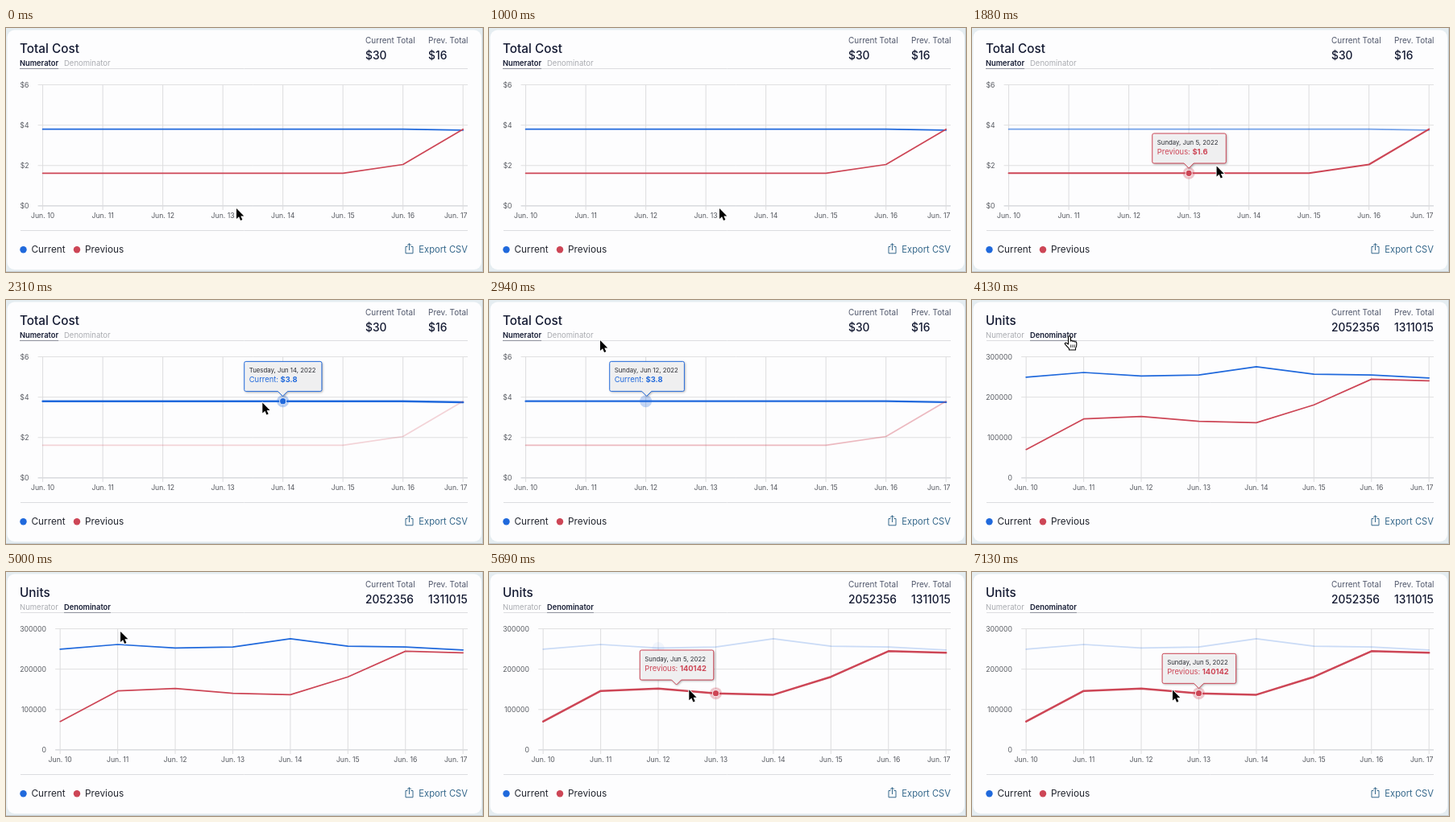
Write an HTML page with a canvas that moves like this. It is 592 px wide and 303 px high and loops after 7.2 s.

```html
<!DOCTYPE html>
<html lang="en">
<head>
<meta charset="utf-8">
<title>Cost chart</title>
<style>
  html, body { margin: 0; width: 100%; height: 100%; overflow: hidden; background: #e5edf1; }
  canvas { display: block; }
</style>
</head>
<body>
<canvas id="stage" width="592" height="303"></canvas>
<script>
const ctx = document.getElementById('stage').getContext('2d');
const LOOP = 7200, CLICK = 3450, MORPH = 500;
const TOP = 70.5, BASE = 220.9, RIGHT = 567.2;
const COLORS = ['#2069dc', '#cd4656'], NAMES = ['Current', 'Previous'];
const INK = '#151b33', MUTED = '#50576b', LINK = '#37698c';
const DAYS = ['Tues', 'Wednes', 'Thurs', 'Fri', 'Satur', 'Sun', 'Mon']; // by June date % 7

const views = [
  { title: 'Total Cost', totals: ['$30', '$16'], max: 6, left: 45.6, labelX: 28.5,
    ticks: ['$0', '$2', '$4', '$6'], format: v => '$' + v.toFixed(1),
    data: [[3.8, 3.8, 3.8, 3.8, 3.8, 3.8, 3.8, 3.75],
           [1.62, 1.62, 1.62, 1.62, 1.62, 1.62, 2.05, 3.8]] },
  { title: 'Units', totals: ['2052356', '1311015'], max: 300000, left: 67.2, labelX: 50,
    ticks: ['0', '100000', '200000', '300000'], format: String,
    data: [[249510, 261140, 252260, 255030, 275420, 256780, 254690, 247526],
           [70213, 146120, 152034, 140142, 136580, 180940, 244416, 240570]] }
];

// Pointer path: time, x, y
const pointerPath = [
  [0, 286, 224], [1500, 286, 224], [2200, 318.3, 127.5], [2330, 318.3, 127.5],
  [2720, 205, 104], [2940, 138, 50], [3250, 121, 45], [4650, 121, 45],
  [5050, 145, 78], [5400, 212, 118], [5672, 248.3, 146.3], [7200, 249, 146.6]
];
// Hovered point: time, series, index (series -1 means none)
const hovers = [
  [0, -1, 0], [1780, 1, 3], [1940, 0, 3], [2020, 0, 4], [2480, 0, 3], [2690, 0, 2], [2905, -1, 0],
  [5030, 0, 1], [5210, 0, 2], [5420, 1, 2], [5672, 1, 3]
];

const clamp = v => Math.max(0, Math.min(1, v));
const lerp = (a, b, k) => a + (b - a) * k;
const smooth = k => k * k * (3 - 2 * k);

function text(str, x, y, size, color, weight = 400, align = 'left') {
  ctx.font = `${weight} ${size}px Inter, sans-serif`;
  ctx.textAlign = align;
  ctx.fillStyle = color;
  ctx.fillText(str, x, y);
  return ctx.measureText(str).width;
}

function line(x1, y1, x2, y2, color, width = 1) {
  ctx.strokeStyle = color;
  ctx.lineWidth = width;
  ctx.beginPath();
  ctx.moveTo(x1, y1);
  ctx.lineTo(x2, y2);
  ctx.stroke();
}

function dot(x, y, r, color, alpha = 1) {
  ctx.globalAlpha = alpha;
  ctx.fillStyle = color;
  ctx.beginPath();
  ctx.arc(x, y, r, 0, 7);
  ctx.fill();
  ctx.globalAlpha = 1;
}

function pointAt(t, series, i) {
  const k = smooth(clamp((t - CLICK) / MORPH));
  const [a, b] = views.map(v => [
    lerp(v.left, RIGHT, i / 7),
    lerp(BASE, TOP, v.data[series][i] / v.max)
  ]);
  return [lerp(a[0], b[0], k), lerp(a[1], b[1], k)];
}

function drawFrame(view, active) {
  ctx.fillStyle = '#e5edf1';
  ctx.fillRect(0, 0, 592, 303);
  ctx.fillStyle = '#fdfdfe';
  ctx.beginPath();
  ctx.roundRect(1.5, 2.5, 588.5, 297.5, 9);
  ctx.fill();
  line(591.5, 0, 591.5, 303, '#c3cacf');
  line(0, 302.5, 592, 302.5, '#c3cacf');

  text(view.title, 17, 31, 15.3, INK, 500);
  line(18, 50.5, 573, 50.5, '#dcdde0');
  [['Numerator', 17], ['Denominator', 72]].forEach(([name, x], i) => {
    const on = i === active;
    const w = text(name, x, 47, on ? 9.3 : 9.5, on ? INK : '#a9abb0', on ? 600 : 400);
    if (on) line(x, 50.5, x + w, 50.5, '#8d909b');
  });
  [['Current Total', 446], ['Prev. Total', 524]].forEach(([name, x], i) => {
    text(name, x, 19, 10, MUTED);
    text(view.totals[i], x, 39, 13.8, INK, 500);
  });

  line(18, 251.5, 573, 251.5, '#dcdde0');
  [21.5, 88].forEach((x, i) => {
    dot(x, 275.2, 4.2, COLORS[i]);
    text(NAMES[i], x + 10, 279.3, 11.8, '#23262f');
  });
  text('Export CSV', 573, 279.3, 11.2, LINK, 400, 'right');
  ctx.strokeStyle = LINK;
  ctx.lineWidth = 1;
  ctx.stroke(new Path2D('M498.5 271.5H496V279.8H505V271.5H502.5M500.5 276V267.8M498.2 270L500.5 267.7L502.8 270'));
}

function drawGrid(t, view) {
  const left = pointAt(t, 0, 0)[0] - 6;
  view.ticks.forEach((label, i) => {
    const y = lerp(BASE, TOP, i / 3);
    line(left, y, 573, y, i ? '#e0e0e1' : '#c6c9ce');
    text(label, view.labelX, y + 3.1, 8.7, '#55585f', 400, 'right');
  });
  for (let i = 0; i < 8; i++) {
    const x = pointAt(t, 0, i)[0];
    line(x, TOP, x, 226, '#dcdcde');
    const last = i === 7;
    text('Jun. ' + (10 + i), last ? 572.5 : x, 236, 8.7, '#55585f', 400, last ? 'right' : 'center');
  }
}

function drawSeries(t, s, now, before) {
  const k = clamp((t - now[0]) / 200);
  const alphaFor = h => h[1] < 0 || h[1] === s ? 1 : 0.23;
  const widthFor = h => h[1] === s ? 2.5 : 1.7;
  ctx.globalAlpha = lerp(alphaFor(before), alphaFor(now), k);
  ctx.strokeStyle = COLORS[s];
  ctx.lineWidth = lerp(widthFor(before), widthFor(now), k);
  ctx.lineJoin = ctx.lineCap = 'round';
  ctx.beginPath();
  for (let i = 0; i < 8; i++) ctx.lineTo(...pointAt(t, s, i));
  ctx.stroke();
  ctx.lineCap = 'butt';
  ctx.globalAlpha = 1;
}

// The label chases its target exponentially and snaps when it reappears.
function tooltipAt(t, past) {
  let pos = null;
  past.forEach(([start, s, i], n) => {
    const end = n + 1 < past.length ? past[n + 1][0] : t;
    if (s < 0) {
      if (end - start > 650) pos = null;
      return;
    }
    const target = pointAt(t, s, i);
    const k = 1 - Math.exp((start - end) / 50);
    pos = pos ? pos.map((v, a) => lerp(v, target[a], k)) : target;
  });
  return pos;
}

function drawTooltip(t, view, past) {
  const pos = tooltipAt(t, past);
  if (!pos) return;
  const now = past[past.length - 1];
  const [, s, i] = now[1] < 0 ? past[past.length - 2] : now;
  const day = (s ? 2 : 10) + i;
  const date = `${DAYS[day % 7]}day, Jun ${day}, 2022`;
  const label = NAMES[s] + ': ';
  const [x, y] = pos;
  ctx.globalAlpha = now[1] < 0 ? 1 - clamp((t - now[0] - 500) / 150) : 1;

  ctx.font = '400 7.8px Inter, sans-serif';
  const w = Math.max(91.5, ctx.measureText(date).width + 13.5);
  const l = Math.max(40, x - w / 2 + 0.4), r = l + w, top = y - 49.3, bottom = y - 12.3;
  ctx.beginPath();
  ctx.moveTo(x - 6, bottom);
  ctx.lineTo(x, y - 6.3);
  ctx.lineTo(x + 6, bottom);
  ctx.arcTo(r, bottom, r, top, 2);
  ctx.arcTo(r, top, l, top, 2);
  ctx.arcTo(l, top, l, bottom, 2);
  ctx.arcTo(l, bottom, x, bottom, 2);
  ctx.closePath();
  ctx.save();
  ctx.shadowColor = 'rgba(0,0,0,.4)';
  ctx.shadowBlur = 3;
  ctx.shadowOffsetX = ctx.shadowOffsetY = 1;
  ctx.fillStyle = 'rgba(245,245,246,.94)';
  ctx.fill();
  ctx.restore();
  ctx.strokeStyle = COLORS[s];
  ctx.lineWidth = 1;
  ctx.stroke();

  text(date, l + 6, top + 13.6, 7.8, '#2c2e35');
  const labelWidth = text(label, l + 6, top + 25.6, 9.4, COLORS[s]);
  text(view.format(view.data[s][i]), l + 6 + labelWidth, top + 25.6, 9.4, COLORS[s], 700);
  ctx.globalAlpha = 1;
}

// Each series has one halo: it jumps between points and fades when the series is left.
function drawMarkers(t, past) {
  past.forEach(([, s, i], n) => {
    const next = past[n + 1];
    if (s < 0 || next && next[1] === s) return;
    const fade = next ? 1 - clamp((t - next[0]) / 330) : 1;
    const [x, y] = pointAt(t, s, i);
    dot(x, y, 7.5, COLORS[s], 0.3 * fade);
    if (!next) {
      dot(x, y, 4.4, '#fff');
      dot(x, y, 3.6, COLORS[s]);
    }
  });
}

const arrow = new Path2D('M0 0V13L3.1 10.3L5.1 15.1L7.4 14.1L5.3 9.4H9.3Z');
const hand = new Path2D('M-1.5 10V1Q0-1.5 1.5 1V6Q3 4.6 4.2 6.4Q5.6 5.4 6.6 7Q8.6 6.2 8.8 8.5V11Q8.6 13.5 7.5 15V17H-.5V15.3Q-3 13-5.8 9.4Q-5.4 7.4-3.6 8.4Z');
const handLines = new Path2D('M1.7 10.5V14M4 10.5V14M6.2 10.5V14');

function drawPointer(t) {
  const n = pointerPath.findIndex(p => p[0] > t);
  const [a, b] = [pointerPath[n - 1], pointerPath[n]];
  const k = (t - a[0]) / (b[0] - a[0]);
  const x = lerp(a[1], b[1], k), y = lerp(a[2], b[2], k);
  const overTab = y < 50 && x > 72 && x < 131;
  ctx.save();
  ctx.translate(x, y);
  ctx.lineJoin = 'round';
  if (overTab) {
    ctx.fillStyle = '#fff';
    ctx.strokeStyle = '#000';
    ctx.lineWidth = 1.1;
    ctx.fill(hand);
    ctx.stroke(hand);
    ctx.lineWidth = 0.8;
    ctx.stroke(handLines);
  } else {
    ctx.strokeStyle = '#fff';
    ctx.lineWidth = 1.8;
    ctx.stroke(arrow);
    ctx.fillStyle = '#000';
    ctx.fill(arrow);
  }
  ctx.restore();
}

function render() {
  const t = performance.now() % LOOP;
  const active = t < CLICK ? 0 : 1;
  const view = views[active];
  const past = hovers.filter(h => h[0] <= t);
  const now = past[past.length - 1];
  const before = past[past.length - 2] || now;

  drawFrame(view, active);
  drawGrid(t, view);
  [0, 1].forEach(s => drawSeries(t, s, now, before));
  drawMarkers(t, past);
  drawTooltip(t, view, past);
  drawPointer(t);
  requestAnimationFrame(render);
}
render();
</script>
</body>
</html>
```
